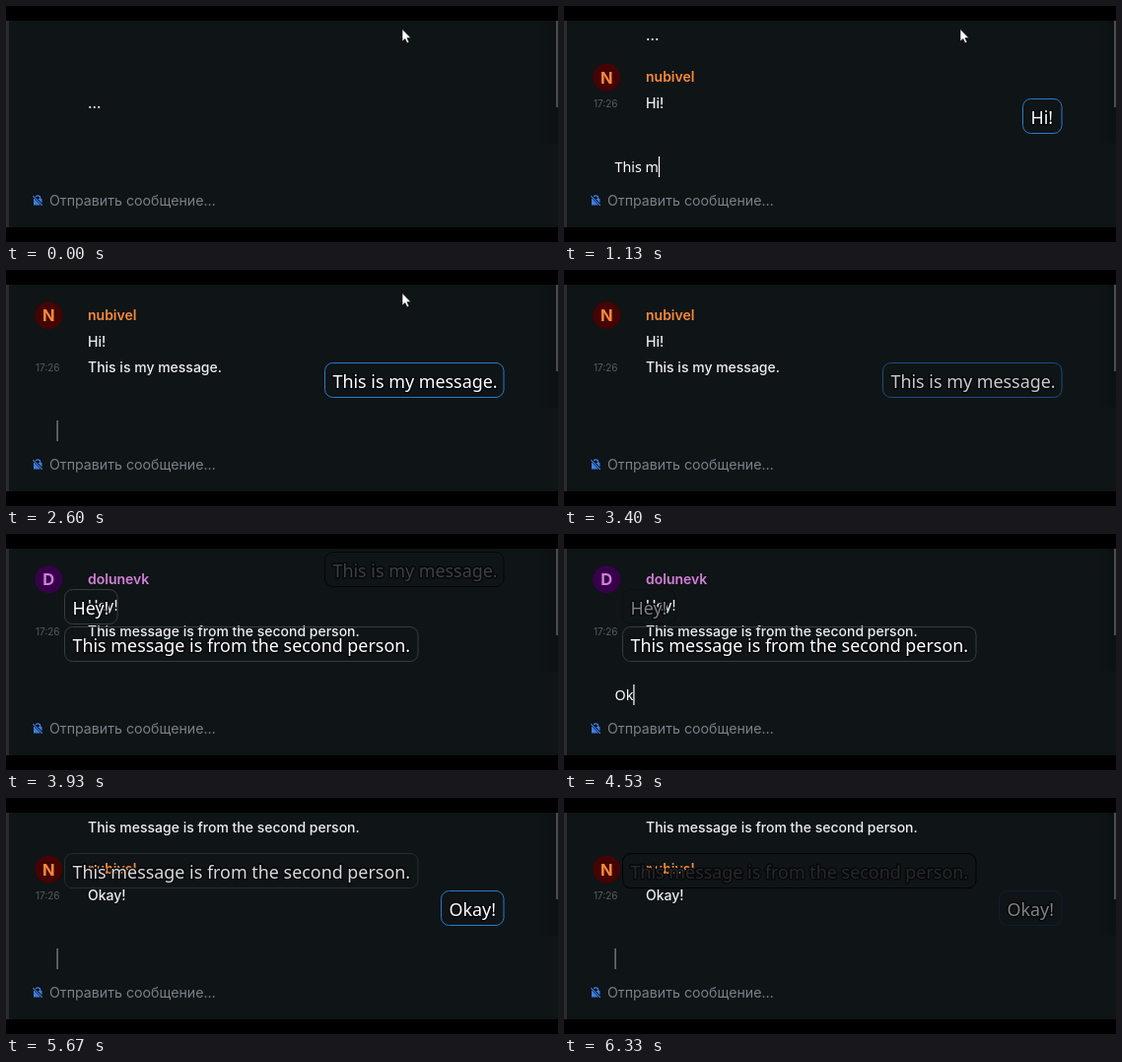
Write an HTML page that moves like this. It is 560 px wide and 240 px high and loops after 6.39 s.

```html
<!DOCTYPE html>
<html lang="ru">
<head>
<meta charset="utf-8">
<title>Live chat bubbles</title>
<style>
  html, body { margin: 0; width: 100%; height: 100%; overflow: hidden; background: #000; }
  svg { display: block; }
  text { white-space: pre; }
  .chat { font: 500 14px Inter, Roboto, sans-serif; fill: #eceef0; }
  .name { font-weight: 600; }
  .initial { font: 700 16.5px Inter, Roboto, sans-serif; text-anchor: middle; }
  .time { font: 10px Inter, Roboto, sans-serif; fill: #565b61; }
  .hint { font: 14.2px Inter, Roboto, sans-serif; fill: #7a8087; }
  .live { font: 17.9px "Noto Sans", "Open Sans", sans-serif; }
  .live text { stroke: #06090b; stroke-width: 3px; stroke-linejoin: round; paint-order: stroke; }
  .draft { font: 14.3px "Noto Sans", "Open Sans", sans-serif; fill: #fff; }
</style>
</head>
<body>
<svg id="stage" width="560" height="240" viewBox="0 0 560 240">
  <defs>
    <clipPath id="window"><rect y="15" width="560" height="210"/></clipPath>
    <linearGradient id="shade">
      <stop offset="0" stop-color="#0a0e11" stop-opacity="0"/>
      <stop offset="1" stop-color="#0a0e11" stop-opacity=".6"/>
    </linearGradient>
  </defs>
  <rect width="560" height="240"/>
  <g clip-path="url(#window)">
    <rect y="15" width="560" height="210" fill="#0f1417"/>
    <rect x="538" y="15" width="22" height="125" fill="url(#shade)"/>
    <rect y="15" width="3" height="210" fill="#292b2f"/>
    <rect x="558" y="15" width="2" height="88" fill="#4b4e51"/>
    <g id="chat"></g>
    <text id="stamp" class="time" x="30" y="103">17:26</text>
    <g id="live" class="live"></g>
    <text id="draft" class="draft" x="51.5" y="169"></text>
    <rect id="caret" y="153" width="1.2" height="21"/>
    <g fill="#3b7de0">
      <path d="M28 196h8.500v6.500h-8.500z"/>
      <path d="M30 197v-1.800a2.300 2.300 0 0 1 4.600 0v1.800" fill="none" stroke="#3b7de0" stroke-width="1.400"/>
      <path d="M27.500 192.800l9.500 10" stroke="#0f1417" stroke-width="2.600"/>
      <path d="M27.300 193.200l9.500 9.600" stroke="#3b7de0" stroke-width="1.200"/>
    </g>
    <text class="hint" x="44" y="203">Отправить сообщение…</text>
    <path id="pointer" d="M402 23.500v12.500l2.900-2.600 2 4.300 2-.9-2-4.200h3.900z" fill="#fff" stroke="#000" stroke-width=".6"/>
  </g>
</svg>
<script>
const LOOP = 6390;
const LINE = 26.3, HEADED_LINE = 69, BUBBLE_STEP = 38;
const POINTER_EXIT = { from: 2730, until: 2930, distance: 150 };
const byId = id => document.getElementById(id);

const people = {
  me: { name: 'nubivel', ink: '#f98a38', disc: '#440403', border: [42, 122, 200] },
  peer: { name: 'dolunevk', ink: '#d27fd6', disc: '#38004a', border: [56, 60, 64] },
};

// posted: chat line appears; sent: live bubble appears; fade: bubble dims to nothing
const messages = [
  { who: 'me', text: 'Hi!', width: 40, sent: 930, posted: 1000, fade: [1700, 2500] },
  { who: 'me', text: 'This is my message.', width: 182, sent: 1930, posted: 2030, fade: [3200, 4170] },
  { who: 'peer', text: 'Hey!', width: 54, sent: 3530, posted: 3600, fade: [4080, 4980] },
  { who: 'peer', text: 'This message is from the second person.', width: 359, sent: 3800, posted: 3870, fade: [5530, 6480] },
  { who: 'me', text: 'Okay!', width: 64, sent: 5000, posted: 5130, fade: [5880, 6800] },
];

// '<' is a backspace
const drafts = [
  { keys: 'Hi!', from: 330, step: 135, until: 930 },
  { keys: 'This m<is my message.', from: 930, step: 39, until: 1930 },
  { keys: 'Okay!', from: 4400, step: 95, until: 5000 },
];

function add(parent, tag, attrs, text = '') {
  const node = document.createElementNS('http://www.w3.org/2000/svg', tag);
  for (const key in attrs) node.setAttribute(key, attrs[key]);
  node.textContent = text;
  return parent.appendChild(node);
}

const clamp = v => Math.min(1, Math.max(0, v));
const show = (node, on) => node.setAttribute('display', on ? 'inline' : 'none');
const shift = (node, x, y) => node.setAttribute('transform', `translate(${x} ${y})`);
const dim = (color, amount) => `rgb(${color.map(c => Math.round(c * amount))})`;
const typeKeys = keys => [...keys].reduce((s, key) => key === '<' ? s.slice(0, -1) : s + key, '');

function buildLine(message, index) {
  const group = add(byId('chat'), 'g', {});
  const person = people[message.who];
  message.headed = index === 0 || messages[index - 1].who !== message.who;
  if (message.headed) {
    add(group, 'circle', { cx: 43.3, cy: 72.5, r: 14, fill: person.disc });
    add(group, 'text', { class: 'initial', x: 43.3, y: 78.5, fill: person.ink }, person.name[0].toUpperCase());
    add(group, 'text', { class: 'chat name', x: 83, y: 77, style: `fill:${person.ink}` }, person.name);
  }
  add(group, 'text', { class: 'chat', x: 83, y: 104 }, message.text);
  message.line = group;
}

function buildBubble(message) {
  const group = add(byId('live'), 'g', {});
  const left = message.who === 'me' ? 505.5 - message.width : 59.5;
  message.frame = add(group, 'rect', { x: left, y: 94.5, width: message.width - .5, height: 35, rx: 8, fill: 'none' });
  message.label = add(group, 'text', { x: left + 8, y: 120 }, message.text);
  message.bubble = group;
}

const opening = add(byId('chat'), 'text', { class: 'chat name', x: 83, y: 104 }, '...');
messages.forEach(buildLine);
messages.forEach(buildBubble);

function drawChat(t) {
  let offset = 0;
  for (const message of [...messages].reverse()) {
    const on = t >= message.posted;
    show(message.line, on);
    if (!on) continue;
    shift(message.line, 0, -offset);
    offset += message.headed ? HEADED_LINE : LINE;
  }
  shift(opening, 0, -offset);
  show(byId('stamp'), t >= messages[0].posted);
}

function drawBubbles(t) {
  let row = 0;
  for (const message of [...messages].reverse()) {
    const [start, end] = message.fade;
    const sent = t >= message.sent;
    show(message.bubble, sent && t < end);
    if (!sent) continue;
    shift(message.bubble, 0, -BUBBLE_STEP * row++);
    const level = clamp((end - t) / (end - start));
    message.frame.setAttribute('stroke', dim(people[message.who].border, level * level));
    message.label.setAttribute('fill', dim([255, 255, 255], level));
  }
}

function drawDraft(t) {
  const current = drafts.find(d => t >= d.from && t < d.until);
  const typed = current ? typeKeys(current.keys.slice(0, 1 + Math.floor((t - current.from) / current.step))) : '';
  const draft = byId('draft'), caret = byId('caret');
  draft.textContent = typed;
  show(caret, t >= 130 && (t < POINTER_EXIT.until || t >= 4330));
  caret.setAttribute('x', 51.5 + (typed ? draft.getComputedTextLength() : 0));
  caret.setAttribute('fill', typed ? '#fff' : '#8b8e91');
}

function drawPointer(t) {
  const { from, until, distance } = POINTER_EXIT;
  const pointer = byId('pointer');
  show(pointer, t < until);
  shift(pointer, distance * clamp((t - from) / (until - from)), 0);
}

function draw(t) {
  drawChat(t);
  drawBubbles(t);
  drawDraft(t);
  drawPointer(t);
}

const origin = performance.now();
function tick() {
  draw((performance.now() - origin) % LOOP);
  requestAnimationFrame(tick);
}
tick();
</script>
</body>
</html>
```
